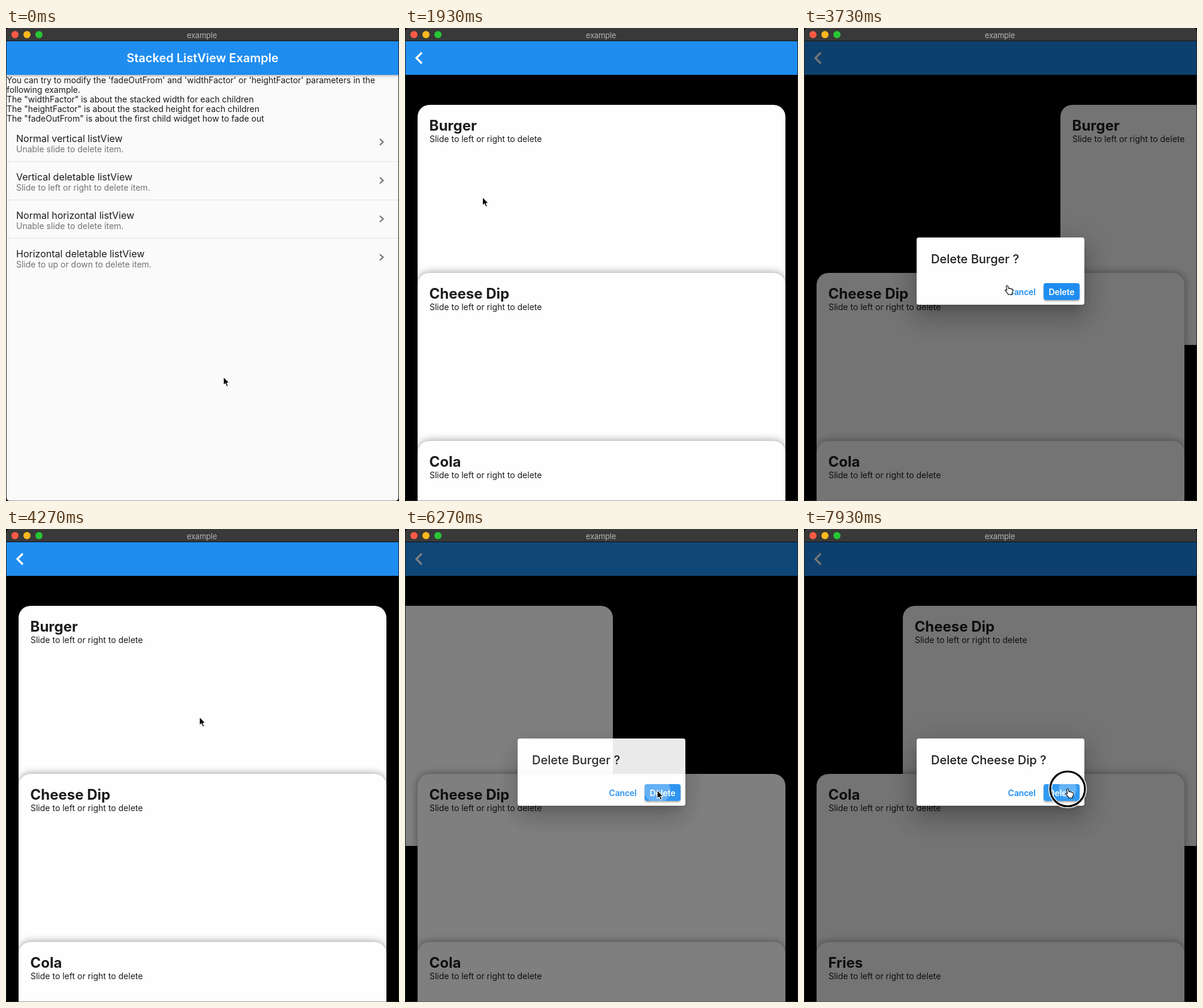
Write an HTML page that moves like this. It is 656 px wide and 788 px high and loops after 8000 ms.

```html
<!DOCTYPE html>
<html lang="en">
<head>
<meta charset="utf-8">
<title>Stacked list</title>
<style>
html, body { margin: 0; width: 100%; height: 100%; overflow: hidden; background: #000; }
body { --blue: #1f8df0; font-family: Inter, sans-serif; color: #1c1c1c; }
div, svg { position: absolute; }
#stage { left: 0; top: 0; width: 656px; height: 788px; overflow: hidden; background: #000; }
#window { left: 1px; top: 0; width: 654px; height: 788px; overflow: hidden; border-radius: 5px; }
#frame { left: 0; top: 0; width: 654px; height: 786px; border: 1px solid rgba(70, 70, 70, .5); border-radius: 6px; }
/* Children keep stage coordinates although the window starts at x = 1. */
.page { left: -1px; top: 0; width: 656px; height: 788px; overflow: hidden; }
.text { line-height: 20px; white-space: pre; }
.bar { left: 0; top: 22px; width: 656px; height: 56px; background: var(--blue); }
.row { left: 0; width: 656px; height: 64px; box-sizing: border-box; border-bottom: 1px solid #e2e2e2; }
.row:last-child { border: 0; }
.row.hover { background: #e8e8e8; }
.card { left: 21px; width: 614px; height: 400px; border-radius: 20px; background: #fefefe;
  box-shadow: 0 0 14px rgba(0, 0, 0, .42); }
#list { background: #fafafa; }
#list .bar { box-shadow: 0 1px 5px rgba(0, 0, 0, .4); }
#detail { background: #000; }
#titlebar { left: -1px; top: 0; width: 656px; height: 21px; background: #393939; border-bottom: 1px solid #111; }
.light { top: 5px; width: 12px; height: 12px; border-radius: 50%; }
#dim { left: 0; top: 22px; width: 656px; height: 766px; background: rgba(0, 0, 0, .54); }
#dialog { left: 188px; top: 349px; width: 280px; height: 112px; border-radius: 4px; background: #fefefe;
  box-shadow: 0 11px 15px -7px rgba(0, 0, 0, .2), 0 24px 38px 3px rgba(0, 0, 0, .14), 0 9px 46px 8px rgba(0, 0, 0, .12); }
#delete, #deleteShadow { left: 212px; top: 76px; width: 60px; height: 28px; border-radius: 4px; }
#delete { overflow: hidden; background: var(--blue); }
#delete.hover { background: #319af3; }
#deleteShadow { box-shadow: 0 2px 3px rgba(0, 0, 0, .35); }
#ripple { width: 44px; height: 44px; margin: -22px; border-radius: 50%; background: rgba(255, 255, 255, .25); }
svg { overflow: visible; left: 0; top: 0; width: 1px; height: 1px; }
</style>
</head>
<body>
<div id="stage">
  <div id="window">
    <div id="list" class="page"><div class="bar"></div></div>
    <div id="detail" class="page">
      <div id="cards"></div>
      <div class="bar"></div>
      <svg><path d="M28 41 19 50 28 59" fill="none" stroke="#fff" stroke-width="3.2"/></svg>
    </div>
    <div id="overlay" class="page">
      <div id="dim"></div>
      <div id="dialog"><div id="deleteShadow"></div><div id="delete"><div id="ripple"></div></div></div>
    </div>
    <div id="titlebar"></div>
  </div>
  <div id="frame"></div>
  <svg id="pointer">
    <g id="ring" fill="none">
      <circle r="29" stroke="#fff" stroke-width="6"/>
      <circle r="29" stroke="#000" stroke-width="3.2"/>
    </g>
    <path id="arrow" fill="#000" stroke="#fff" stroke-width="1.1" stroke-linejoin="round"
      d="M0 0V14.2L3.2 11.3 5.4 16.4 7.8 15.4 5.7 10.4H10Z"/>
    <path id="hand" fill="#fff" stroke="#000" stroke-width="1.1" stroke-linejoin="round"
      d="M-1.5 1.3C-1.5-.5 1.2-.5 1.4 1.2L2.2 5C3 4 4.6 4.2 5 5.4 5.8 4.6 7.2 5 7.4 6.2 8.4 5.6 9.6 6.2 9.7 7.6 9.8 9.6 9.3 11 8.4 12.8V15H1.5V13.6L-2.6 9.4C-4.4 7.6-2.6 6.4-1 7.6L-.3 8.2Z"/>
  </svg>
</div>
<script>
const LOOP = 8000;
const $ = id => document.getElementById(id);

function add(parent, className, css = '') {
  const node = document.createElement('div');
  node.className = className;
  node.style.cssText = css;
  parent.append(node);
  return node;
}

// Places a line of text by its left edge and the middle of its capitals.
function text(parent, string, x, middle, size, css = '') {
  const node = add(parent, 'text', `left:${x}px;top:${middle - 10}px;font-size:${size}px;${css}`);
  node.textContent = string;
  return node;
}

const centred = (width, css) => `width:${width}px;text-align:center;${css}`;

// Title bar
['#fd5a46', '#fdb81e', '#28c634'].forEach((color, i) =>
  add($('titlebar'), 'light', `left:${9 + 20 * i}px;background:${color}`));
text($('titlebar'), 'example', 227, 11.5, 13, centred(200, 'color:#b2b2b2;letter-spacing:-.2px'));

// List page
text($('list'), 'Stacked ListView Example', 0, 50, 20, centred(656, 'color:#fff;font-weight:600'));
[
  "You can try to modify the 'fadeOutFrom' and 'widthFactor' or 'heightFactor' parameters in the",
  'following example.',
  'The "widthFactor" is about the stacked width for each children',
  'The "heightFactor" is about the stacked height for each children',
  'The "fadeOutFrom" is about the first child widget how to fade out'
].forEach((line, i) => text($('list'), line, 1, 87 + 16 * i, 14, 'letter-spacing:-.03px'));

const rows = [
  ['Normal vertical listView', 'Unable slide to delete item.'],
  ['Vertical deletable listView', 'Slide to left or right to delete item.'],
  ['Normal horizontal listView', 'Unable slide to delete item.'],
  ['Horizontal deletable listView', 'Slide to up or down to delete item.']
].map(([title, note], i) => {
  const row = add($('list'), 'row', `top:${159 + 64 * i}px`);
  text(row, title, 17, 24.5, 16);
  text(row, note, 17, 43, 14, 'color:#737373');
  row.insertAdjacentHTML('beforeend',
    '<svg><path d="M624 26 629.5 31 624 36" fill="none" stroke="#737373" stroke-width="2.2"/></svg>');
  return row;
});

// Stacked cards
const names = ['Burger', 'Cheese Dip', 'Cola', 'Fries'];
const cards = names.map(name => {
  const card = add($('cards'), 'card');
  text(card, name, 19.5, 34.5, 24, 'font-weight:700');
  text(card, 'Slide to left or right to delete', 20, 57, 14);
  return card;
});

// Dialog
const question = text($('dialog'), '', 24, 36, 20, 'font-weight:500');
text($('dialog'), 'Cancel', 145, 91, 14, centred(61, 'color:var(--blue);font-weight:600;letter-spacing:-.2px'));
text($('delete'), 'Delete', 0, 15, 14, centred(60, 'color:#fff;font-weight:600;letter-spacing:-.1px'));

// What the user does; pointer, cards and dialog all follow from this.
const tap = (start, x, y) => ({ start, end: start + 80, x, y, dx: 0 });
const drag = (card, start, end, x, y, dx) => ({ card, start, end, x, y, dx });
const openRow = tap(1050, 125, 260);
const slides = [
  { drag: drag(0, 2400, 2820, 131, 289, 407), answer: tap(3850, 339, 429) },
  { drag: drag(0, 4350, 4580, 323, 313, -104), answer: tap(5180, 362, 438) },
  { drag: drag(0, 5600, 5820, 508, 320, -288), answer: tap(6140, 421, 435) },
  { drag: drag(1, 6850, 7150, 200, 283, 144), answer: tap(7860, 440, 433) }
];
const gestures = [openRow, ...slides.flatMap(s => [s.drag, s.answer])];
const DELETE_LEFT = 400;

const clamp = v => Math.min(1, Math.max(0, v));
const mix = (a, b, k) => a + (b - a) * k;
const smooth = v => v * v * (3 - 2 * v);
const easeOut = v => 1 - (1 - v) ** 3;
const span = (t, from, length) => clamp((t - from) / length);
const show = (node, on) => { node.style.display = on ? '' : 'none'; };

const dragged = (g, t) => g.dx * smooth(span(t, g.start, g.end - g.start));

// The pointer rests briefly after each gesture, then glides to the next.
function pointerAt(t) {
  let last = { x: 363, y: 581, dx: 0, start: 0, end: 0 };
  for (const g of gestures) {
    if (t < g.start) {
      const gap = g.start - last.end;
      const rest = Math.min(150, gap * .3);
      const k = smooth(span(t, last.end + rest, gap - 2 * rest));
      return [mix(last.x + last.dx, g.x, k), mix(last.y, g.y, k)];
    }
    last = g;
  }
  return [last.x, last.y];
}

// A cancelled card glides home, a deleted one leaves and the rest move up.
function cardState({ drag: g, answer }, t) {
  const removed = answer.x > DELETE_LEFT;
  const k = smooth(span(t, answer.end + 60, 180));
  return {
    shift: mix(dragged(g, t), removed ? Math.sign(g.dx) * 656 : 0, k),
    collapse: removed ? smooth(span(t, answer.end + 240, 300)) : 0
  };
}

function render(t) {
  const [x, y] = pointerAt(t);

  const turn = easeOut(span(t, openRow.end, 420));
  $('list').style.transform = `translateX(${-218 * turn}px)`;
  $('detail').style.transform = `translateX(${656 * (1 - turn)}px)`;
  show($('list'), turn < 1);
  show($('detail'), turn > 0);

  const hovered = turn < .3 ? Math.floor((y - 159) / 64) : -1;
  rows.forEach((row, i) => row.classList.toggle('hover', i === hovered));

  const current = slides.findLast(s => t >= s.drag.start) || slides[0];
  const { drag: g, answer } = current;
  const { shift, collapse } = cardState(current, t);
  const first = g.card + collapse;
  cards.forEach((card, i) => {
    const left = i === g.card ? shift : 0;
    const slot = i === g.card ? 0 : i - first;
    card.style.transform = `translate(${left}px, ${128 + 280 * slot}px)`;
    show(card, i >= first);
  });

  const opened = g.end + 60;
  const closing = span(t, answer.end, 180);
  const fade = easeOut(span(t, opened, 180)) * (1 - closing ** 2);
  $('overlay').style.opacity = fade;
  question.textContent = `Delete ${names[g.card]} ?`;

  const onButton = fade > 0 && !closing && y > 425 && y < 453 && x > 333 && x < 460;
  $('delete').classList.toggle('hover', onButton && x > DELETE_LEFT);
  const spread = span(t, answer.start, 130);
  show($('ripple'), spread > 0 && answer.x > DELETE_LEFT);
  $('ripple').style.transform =
    `translate(${answer.x - DELETE_LEFT}px, ${answer.y - 425}px) scale(${mix(.3, 1, spread)})`;

  const pointing = onButton || (hovered >= 0 && hovered < rows.length);
  $('pointer').style.transform = `translate(${x}px, ${y}px)`;
  show($('hand'), pointing);
  show($('arrow'), !pointing);
  show($('ring'), gestures.some(p => t >= p.start && t < p.end));
}

const start = performance.now();
function tick() {
  render((performance.now() - start) % LOOP);
  requestAnimationFrame(tick);
}
tick();
</script>
</body>
</html>
```
